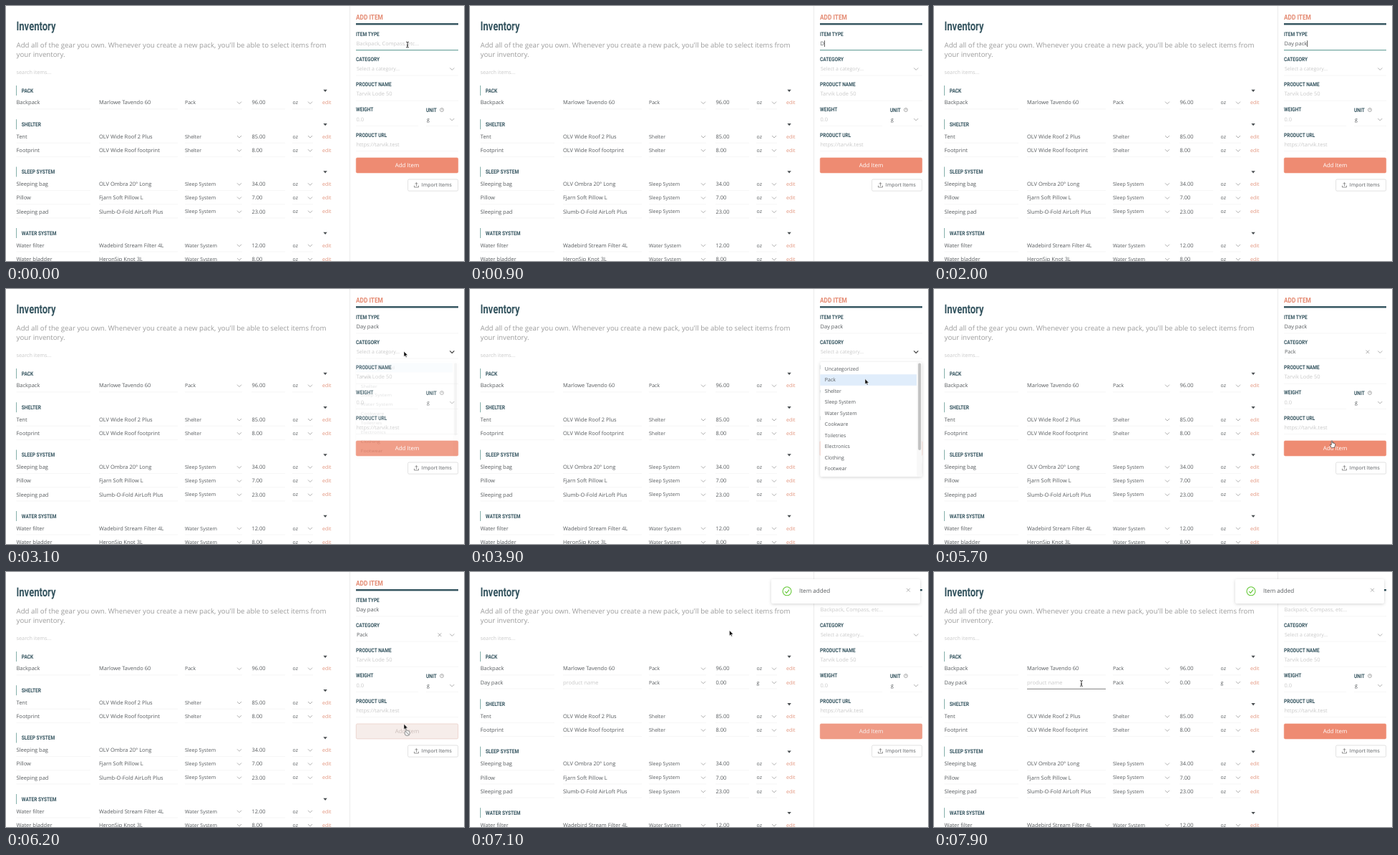
An HTML page for the animation above (8 s loop, 640 by 356 pixels).

```html
<!DOCTYPE html>
<html lang="en">
<head>
<meta charset="utf-8">
<title>Inventory</title>
<style>
  html, body { margin: 0; width: 100%; height: 100%; overflow: hidden; background: #fff; }
  svg { display: block; width: 100vw; height: 100vh; }
  text { font-family: "Open Sans", "Noto Sans", sans-serif; text-rendering: geometricPrecision; white-space: pre; }
  .head { font-family: Roboto, "Liberation Sans", sans-serif; font-weight: 700; }
  .shadow { filter: drop-shadow(0 1px 2px rgba(0, 0, 0, .17)); }
</style>
</head>
<body>
<svg id="stage" viewBox="0 0 640 356"></svg>
<script>
const LOOP = 8000, PITCH = 19.2;
const DARK = '#34545f', TEXT = '#575b5e', HINT = '#c9c9c9', RULE = '#f3f3f3',
      CORAL = '#ee8b72', TEAL = '#5b9a92', GREY = '#9a9a9a';
const stage = document.getElementById('stage');

function el(tag, attrs, parent = stage) {
  const node = document.createElementNS('http://www.w3.org/2000/svg', tag);
  set(node, attrs);
  parent.appendChild(node);
  return node;
}
function set(node, attrs) {
  for (const k in attrs) node.setAttribute(k, attrs[k]);
}
const group = (parent = stage) => el('g', {}, parent);
const show = (node, on) => { node.style.display = on ? '' : 'none'; };

// y is the vertical middle of the capitals
function label(parent, x, y, str, size = 7.5, fill = TEXT, anchor = 'start') {
  const node = el('text', { x, y: y + size * .33, 'font-size': size, fill, 'text-anchor': anchor }, parent);
  node.textContent = str;
  return node;
}
function heading(parent, x, y, str, size = 7.8, fill = DARK, narrow = .84) {
  const node = el('text', {
    class: 'head', 'font-size': size, fill,
    transform: `translate(${x} ${y + size * .335}) scale(${narrow} 1)`
  }, parent);
  node.textContent = str;
  return node;
}
const rect = (parent, x, y, width, height, fill, more = {}) =>
  el('rect', { x, y, width, height, fill, ...more }, parent);
const path = (parent, d, stroke, width = .8, more = {}) =>
  el('path', { d, stroke, 'stroke-width': width, fill: 'none', ...more }, parent);
const rule = (parent, x1, x2, y, color = RULE, width = .7) =>
  path(parent, `M${x1} ${y}H${x2}`, color, width);
const chevron = (parent, x, y, color = GREY, width = .8) =>
  path(parent, `M${x - 3} ${y - 1.4}l3 3 3-3`, color, width);
const cross = (parent, x, y, r, color, width = .8) =>
  path(parent, `M${x - r} ${y - r}l${2 * r} ${2 * r}m0 ${-2 * r}l${-2 * r} ${2 * r}`, color, width);

/* ---- inventory table ---- */
const table = group();
heading(table, 14.5, 27.8, 'Inventory', 17.4, DARK, .75);
label(table, 14.5, 54.3, "Add all of the gear you own. Whenever you create a new pack, you'll be able to select items from", 9.7, '#9c9c9c');
label(table, 14.5, 67.3, 'your inventory.', 9.7, '#9c9c9c');
label(table, 14.5, 92.5, 'search items...', 7.3, HINT);

function section(parent, y, name) {
  path(parent, `M14.5 ${y - 7}v14`, '#86b0aa', 1);
  heading(parent, 21.8, y, name);
  el('path', { d: `M443.4 ${y - 1.3}h5.4l-2.7 3.4z`, fill: '#4a4f52' }, parent);
}
function row(parent, y, item, product, kind, weight, unit, hint) {
  for (const [a, b] of [[14.5, 118], [130, 240], [250, 330], [343, 390], [400, 429]])
    rule(parent, a, b, y + 8.8);
  label(parent, 14.5, y, item);
  label(parent, 130, y, product, 7.5, hint ? HINT : TEXT);
  label(parent, 250, y, kind, 7);
  chevron(parent, 326, y);
  label(parent, 343.5, y, weight);
  label(parent, 400.5, y, unit, 7);
  chevron(parent, 425, y);
  label(parent, 442, y, 'edit', 7, '#e2937c');
}

section(table, 118, 'PACK');
row(table, 135, 'Backpack', 'Marlowe Tavendo 60', 'Pack', '96.00', 'oz');

const newRow = group(table);
row(newRow, 135 + PITCH, 'Day pack', 'product name', 'Pack', '0.00', 'g', true);
const newLine = rule(newRow, 130, 240, 163.3, '#777', .9);

const rest = group(table);
const sections = [
  ['Shelter', [
    ['Tent', 'OLV Wide Roof 2 Plus', '85.00'],
    ['Footprint', 'OLV Wide Roof footprint', '8.00']]],
  ['Sleep System', [
    ['Sleeping bag', 'OLV Ombra 20° Long', '34.00'],
    ['Pillow', 'Fjarn Soft Pillow L', '7.00'],
    ['Sleeping pad', 'Slumb-O-Fold AirLoft Plus', '23.00']]],
  ['Water System', [
    ['Water filter', 'Wadebird Stream Filter 4L', '12.00'],
    ['Water bladder', 'HeronSip Knot 3L', '8.00']]]
];
let y = 165.2;
for (const [kind, items] of sections) {
  section(rest, y, kind.toUpperCase());
  y += 17.2;
  for (const [item, product, weight] of items) {
    row(rest, y, item, product, kind, weight, 'oz');
    y += PITCH;
  }
  y += 10.7;
}

/* ---- form panel ---- */
const panel = group();
rect(panel, 480.5, 0, 159.5, 356, '#fff');
path(panel, 'M480.5 0V356', '#ebebeb', 1);
heading(panel, 489, 15.6, 'ADD ITEM', 9.9, '#e48a72');
rect(panel, 489, 24, 143, 2.4, DARK);
['ITEM TYPE', 'CATEGORY', 'PRODUCT NAME', 'WEIGHT', 'PRODUCT URL']
  .forEach((name, i) => heading(panel, 489, 39.1 + i * 35.25, name));
heading(panel, 587, 144.9, 'UNIT');
el('circle', { cx: 609, cy: 145, r: 2.5, fill: 'none', stroke: '#777', 'stroke-width': .6 }, panel);
path(panel, 'M608.2 144.4q.8-1.2 1.5-.2q.2.5-.7 1.1v.3', '#777', .5);

rule(panel, 489, 632, 61.8);
rule(panel, 489, 632, 97);
rule(panel, 489, 632, 132.2);
rule(panel, 489, 576, 167.4);
rule(panel, 587, 632, 167.4);
rule(panel, 489, 632, 202.6);
const typeLine = rule(panel, 489, 632, 61.6, TEAL, 1);
const nameLine = rule(panel, 489, 632, 132.2, '#6f777a', 1);

const typeHint = label(panel, 489.5, 52.5, 'Backpack, Compass, etc...', 7.4, HINT);
const typed = label(panel, 489.5, 52.5, '');
const caret = path(panel, 'M0 48.2V57', '#333', .8);
const catHint = label(panel, 490, 87.7, 'Select a category...', 7, HINT);
const catValue = label(panel, 490, 87.7, 'Pack', 7.2);
label(panel, 489.5, 123, 'Tarvik Lode 50', 7.5, HINT);
label(panel, 489.5, 158.3, '0.0', 7.5, HINT);
label(panel, 588, 158.3, 'g', 7);
label(panel, 489.5, 193.5, 'https://tarvik.test', 7.5, HINT);
chevron(panel, 623.3, 87.8);
chevron(panel, 623.3, 158.4);
const clearX = cross(panel, 606, 87.7, 2.3, GREY);
const hot = group(panel);
chevron(hot, 623.3, 87.8, '#444', 1.2);
const hotX = cross(hot, 606, 87.7, 2.3, '#444', 1.1);

const button = rect(panel, 489.3, 212, 142.4, 20.9, CORAL, { rx: 1.6, 'stroke-width': .7 });
const buttonText = label(panel, 560.5, 222.6, 'Add Item', 7.9, '#fff', 'middle');
rect(panel, 561.6, 242, 70, 16.2, '#fff', { rx: 1.6, stroke: '#d6d6d6', 'stroke-width': .7 });
path(panel, 'M570.5 250.7v2.3h6V250.7M573.5 251.3V246.7m-1.8 1.8l1.8-1.8 1.8 1.8', '#666', .7);
label(panel, 580.8, 250, 'Import Items', 6.95);

/* ---- category menu ---- */
const menu = group();
rect(menu, 489.3, 102, 142.4, 160, '#fff', { rx: 2, class: 'shadow' });
const pick = rect(menu, 489.3, 0, 134.7, 15.6, '#e0edfb');
['Uncategorized', 'Pack', 'Shelter', 'Sleep System', 'Water System', 'Cookware',
 'Toiletries', 'Electronics', 'Clothing', 'Footwear']
  .forEach((name, i) => label(menu, 495.8, 111.4 + i * 15.5, name, 7));
rect(menu, 624.4, 102.5, 7, 159, '#f8f8f8');
rect(menu, 626.2, 103.5, 4, 121.5, '#c2c2c2', { rx: 2 });

/* ---- notification ---- */
const toast = group();
rect(toast, 421, 10, 208, 34, '#fff', { rx: 2, class: 'shadow' });
el('circle', { cx: 443, cy: 26.8, r: 6, fill: 'none', stroke: '#62c834', 'stroke-width': 1.1 }, toast);
path(toast, 'M440.2 27l2.1 2.3 3.8-4.7', '#62c834', 1.1);
label(toast, 460, 26.7, 'Item added', 8.1);
cross(toast, 612.5, 25.2, 2.4, GREY);

/* ---- pointer ---- */
const pointer = group();
const arrow = parent => el('path', {
  d: 'M0 0V7.6L1.8 6 2.9 8.6 4.1 8.1 3 5.5H5.4Z', fill: '#111', stroke: '#fff', 'stroke-width': .5
}, parent);
const shapes = { arrow: group(pointer), beam: group(pointer), hand: group(pointer), blocked: group(pointer) };
arrow(shapes.arrow);
path(shapes.beam, 'M-1.9-3.9Q0-3.9 0-2.9Q0-3.9 1.9-3.9M0-3V3M-1.9 3.9Q0 3.9 0 2.9Q0 3.9 1.9 3.9M-1 .9h2', '#222', .9);
el('path', {
  d: 'M-.8 0Q0-.8.8 0V3Q2-.1 2.4 3.2 4.4 2.6 4.6 4.2V6.4L3.6 9H-.6L-3 5.6Q-2.4 4.3-.8 5.8Z',
  fill: '#fff', stroke: '#222', 'stroke-width': .6
}, shapes.hand);
el('circle', { cx: 4.7, cy: 12.6, r: 3.7, fill: '#eee', stroke: '#8f8f8f', 'stroke-width': 1 }, shapes.blocked);
path(shapes.blocked, 'M2.2 10l5 5.2', '#8f8f8f', 1);
arrow(shapes.blocked);

/* ---- timeline ---- */
const moves = [
  [0, 561, 54], [2500, 561, 54], [3000, 556, 87], [3250, 556, 87], [3800, 552, 125.5],
  [4400, 552, 125.5], [4950, 559, 184], [5100, 559, 184], [5550, 556, 212.3], [6450, 556, 212.3],
  [7080, 362.5, 81.5], [7200, 362.5, 81.5], [7750, 206, 155.5]
];
const kinds = [[0, 'beam'], [900, ''], [2500, 'beam'], [2750, 'arrow'], [4650, 'beam'],
  [5400, 'hand'], [5900, 'blocked'], [6500, 'arrow'], [7650, 'beam']];
const typing = [[0, 0], [900, 1], [1100, 2], [1400, 3], [1600, 4], [1800, 5], [2000, 8]];

const T = { blur: 3000, open: 3050, choose: 4300, submit: 5900, added: 6500 };
const clamp = v => Math.max(0, Math.min(1, v));
const ramp = (t, a, b) => clamp((t - a) / (b - a));
const ease = p => p * p * (3 - 2 * p);
const at = (list, t) => list.filter(k => k[0] <= t).pop()[1];
const mix = (a, b, p) => `rgb(${a.map((v, i) => Math.round(v + (b[i] - v) * p))})`;

function position(t) {
  const i = moves.findIndex(m => m[0] > t);
  if (i < 0) return moves[moves.length - 1].slice(1);
  const [a, b] = [moves[i - 1], moves[i]];
  const p = ease(ramp(t, a[0], b[0]));
  return [a[1] + (b[1] - a[1]) * p, a[2] + (b[2] - a[2]) * p];
}

function draw(t) {
  const added = t >= T.added;
  const [px, py] = position(t), kind = at(kinds, t);

  set(pointer, { transform: `translate(${px} ${py})` });
  for (const k in shapes) show(shapes[k], k === kind);

  const count = added ? 0 : at(typing, t);
  typed.textContent = 'Day pack'.slice(0, count);
  show(typeHint, !count);
  show(typeLine, t < T.blur);
  const blink = t >= 900 || (t >= 100 && t < 600);
  show(caret, t < T.blur && blink);
  set(caret, { transform: `translate(${490 + (count ? typed.getComputedTextLength() : 0)} 0)` });

  const chosen = t >= T.choose && !added;
  show(catValue, chosen);
  show(catHint, !chosen);
  show(clearX, chosen);
  show(hotX, chosen);
  hot.style.opacity = t < 4500 ? ramp(t, 2800, 2950) : 1 - ramp(t, 5000, 5200);
  nameLine.style.opacity = ramp(t, 4650, 4750) * (1 - ramp(t, 5000, 5200));

  const open = ease(ramp(t, T.open, T.open + 200)) * (1 - ramp(t, T.choose, T.choose + 180));
  show(menu, open > 0);
  menu.style.opacity = open;
  set(menu, { transform: `translate(0 ${102 * .2 * (1 - open)}) scale(1 ${.8 + .2 * open})` });
  set(pick, { y: py > 119 ? 119.2 : 103.7 });

  const off = ramp(t, T.submit, T.submit + 200) * (1 - ramp(t, 6600, 7200));
  set(button, {
    fill: mix([238, 139, 114], [246, 237, 234], off),
    stroke: mix([238, 139, 114], [232, 203, 194], off)
  });
  set(buttonText, { fill: mix([255, 255, 255], [203, 190, 186], off) });

  show(newRow, added);
  set(rest, { transform: `translate(0 ${added ? PITCH : 0})` });
  newLine.style.opacity = ramp(t, 7600, 7800);

  const slide = ramp(t, T.added, T.added + 200);
  show(toast, added);
  toast.style.opacity = slide;
  set(toast, { transform: `translate(${210 * (1 - slide) ** 2} 0)` });
}

const start = performance.now();
function tick() {
  draw((performance.now() - start) % LOOP);
  requestAnimationFrame(tick);
}
tick();
</script>
</body>
</html>
```
